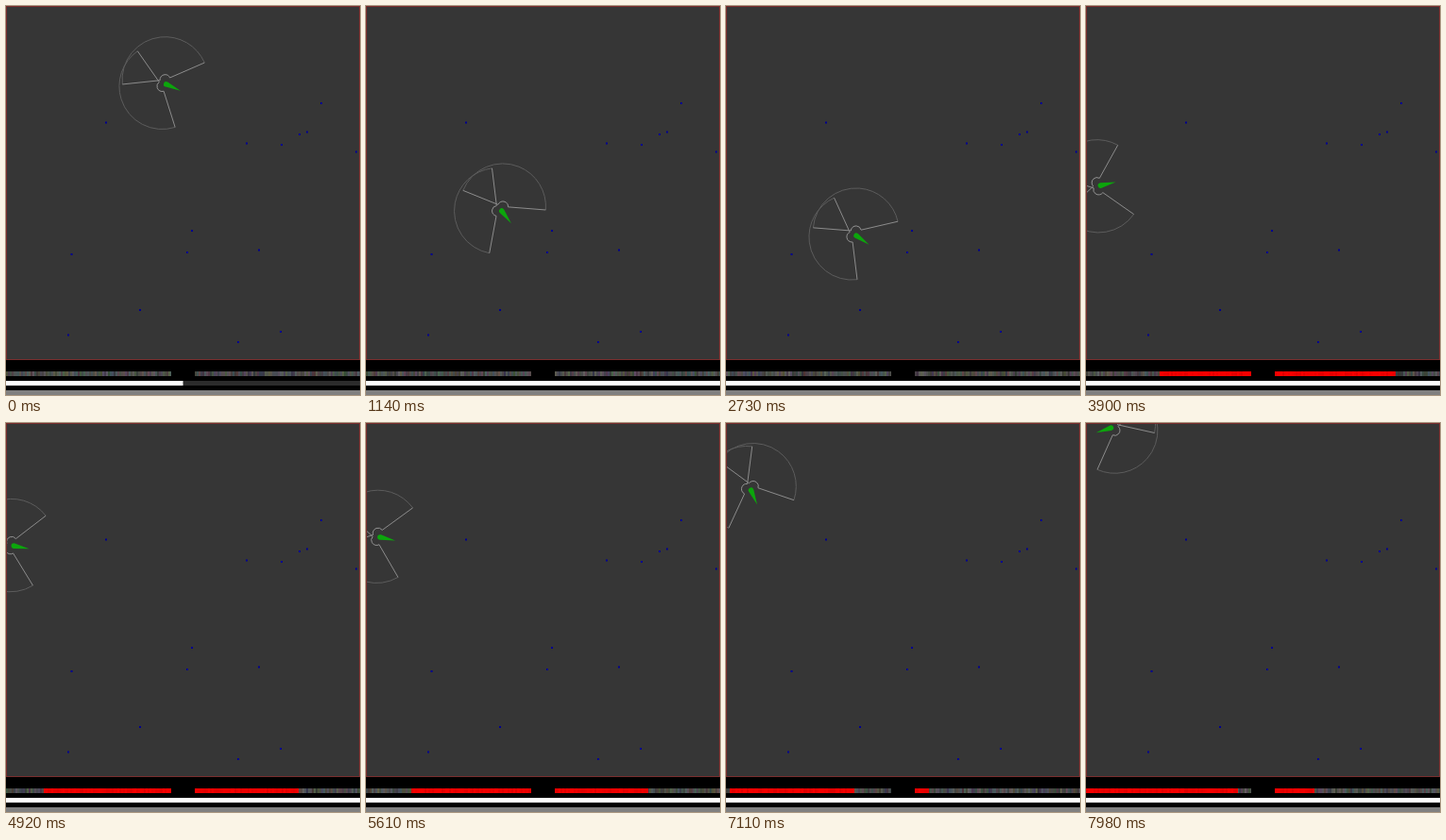
An HTML page with a canvas that plays this animation: 375x412 px, repeating every 8 s.

```html
<!DOCTYPE html>
<html lang="en">
<head>
<meta charset="utf-8">
<title>Wanderer</title>
<style>
html, body { margin: 0; width: 100%; height: 100%; overflow: hidden; background: #000; }
canvas { display: block; width: 375px; height: 412px; }
</style>
</head>
<body>
<canvas id="stage"></canvas>
<script>
const W = 375, H = 412, LOOP = 8000, STEP = 30;
const SIGHT = 45.5, NEAR = 5.5, EYE_GAP = 3.75;
const OUTER = 132, INNER = 30.5; // field of view either side of the heading, degrees
const STRIP = 175;
const rad = Math.PI / 180;

const canvas = document.getElementById('stage');
const scale = window.devicePixelRatio || 1;
canvas.width = W * scale;
canvas.height = H * scale;
const ctx = canvas.getContext('2d');
ctx.scale(scale, scale);

// time, x, y, heading
const poses = [
  [0, 167, 81.6, 204.5],
  [1140, 142, 214.7, 232.5],
  [2730, 135.6, 241.5, 215],
  [3900, 12.5, 190.8, 167],
  [4920, 5.4, 129.6, 190.5],
  [6300, 20.9, 111, 193.5],
  [7980, 29.3, 4.2, 342]
];

const food = [
  [106, 123.5], [334, 103], [311, 136], [319, 133.5], [255, 145.5],
  [292, 147], [371, 154.5], [197, 238], [192, 261], [268, 258.5],
  [69.5, 263], [142, 322], [66, 348.5], [246, 356], [291, 345]
];

function secant(i, k) {
  const a = poses[i], b = poses[i + 1];
  return (b[k] - a[k]) / (b[0] - a[0]);
}

// Monotone slope, so nothing overshoots the walls
function slope(i, k) {
  if (i === 0) return secant(0, k);
  if (i === poses.length - 1) return secant(i - 1, k);
  const a = secant(i - 1, k), b = secant(i, k);
  return a * b > 0 ? 2 * a * b / (a + b) : 0;
}

function poseAt(t) {
  let i = 0;
  while (i < poses.length - 2 && t > poses[i + 1][0]) i++;
  const a = poses[i], b = poses[i + 1];
  const d = b[0] - a[0], u = (t - a[0]) / d, v = 1 - u;
  const mix = k =>
    v * v * (1 + 2 * u) * a[k] + u * u * (3 - 2 * u) * b[k] +
    d * u * v * (v * slope(i, k) - u * slope(i + 1, k));
  return { x: mix(1), y: mix(2), h: mix(3) };
}

function hash(a, b) {
  let n = Math.imul(a + 11, 374761393) ^ Math.imul(b + 7, 668265263);
  n = Math.imul(n ^ (n >>> 13), 1274126177);
  return ((n ^ (n >>> 16)) >>> 0) / 4294967296;
}

function rect(color, x, y, w, h) {
  ctx.fillStyle = color;
  ctx.fillRect(x, y, w, h);
}

function eyesOf(p) {
  const side = (p.h + 90) * rad;
  const dx = Math.cos(side) * EYE_GAP, dy = Math.sin(side) * EYE_GAP;
  return [
    { x: p.x - dx, y: p.y - dy, from: p.h - OUTER, to: p.h + INNER },
    { x: p.x + dx, y: p.y + dy, from: p.h - INNER, to: p.h + OUTER }
  ];
}

function arc(eye, r, color) {
  ctx.strokeStyle = color;
  ctx.beginPath();
  ctx.arc(eye.x, eye.y, r, eye.from * rad, eye.to * rad);
  ctx.stroke();
}

function drawEye(eye) {
  arc(eye, SIGHT, '#5c5c5c');
  arc(eye, NEAR, '#929292');
  ctx.strokeStyle = '#8c8c8c';
  for (const deg of [eye.from, eye.to]) {
    const c = Math.cos(deg * rad), s = Math.sin(deg * rad);
    ctx.beginPath();
    ctx.moveTo(eye.x + c * NEAR, eye.y + s * NEAR);
    ctx.lineTo(eye.x + c * SIGHT, eye.y + s * SIGHT);
    ctx.stroke();
  }
}

function drawBody(p) {
  ctx.save();
  ctx.translate(p.x, p.y);
  ctx.rotate(p.h * rad);
  ctx.fillStyle = '#0ca50c';
  ctx.beginPath();
  ctx.arc(-3, 0, 2.8, -100 * rad, 100 * rad);
  ctx.lineTo(-19.5, 0);
  ctx.closePath();
  ctx.fill();
  ctx.restore();
}

// What an eye sees: red for a wall in range, dim static otherwise
function drawStrip(eye, left, step) {
  for (let i = 0; i < STRIP; i++) {
    const a = (eye.from + (eye.to - eye.from) * (i + 0.5) / STRIP) * rad;
    const x = eye.x + Math.cos(a) * SIGHT, y = eye.y + Math.sin(a) * SIGHT;
    const wall = x < 0 || y < 0 || x > W || y > W;
    const cell = left + (i >> 1);
    const n = k => hash(step * 4 + k, cell);
    let color;
    if (wall) {
      color = `rgb(${225 + 30 * n(0) | 0},0,0)`;
    } else {
      const c = k => 48 + 24 * n(0) + 30 * n(k) | 0;
      color = `rgb(${c(1)},${c(2)},${c(3)})`;
    }
    rect(color, left + i, 387, 1, 5);
  }
}

function draw(time) {
  const step = Math.floor(time / STEP), t = step * STEP;
  const p = poseAt(t), eyes = eyesOf(p);

  rect('#000', 0, 0, W, H);
  rect('#363636', 0, 0, W, W);

  ctx.save();
  ctx.beginPath();
  ctx.rect(0, 0, W, W);
  ctx.clip();
  ctx.lineWidth = 1;
  for (const [x, y] of food) rect('#00008f', x - 1, y - 1, 2, 2);
  eyes.forEach(drawEye);
  drawBody(p);
  ctx.strokeStyle = '#7a2e2e';
  ctx.strokeRect(0.5, 0.5, W - 1, W - 1);
  ctx.restore();

  drawStrip(eyes[0], 0, step);
  drawStrip(eyes[1], W - STRIP, step);

  rect('#2c2c2c', 0, 397, W, 5);
  rect('#fff', 0, 397, W * Math.min(1, 0.5 + t / 1620), 5);
  rect('#808080', 0, 407, W, 5);
}

const start = performance.now();
function tick() {
  draw((performance.now() - start) % LOOP);
  requestAnimationFrame(tick);
}
tick();
</script>
</body>
</html>
```
